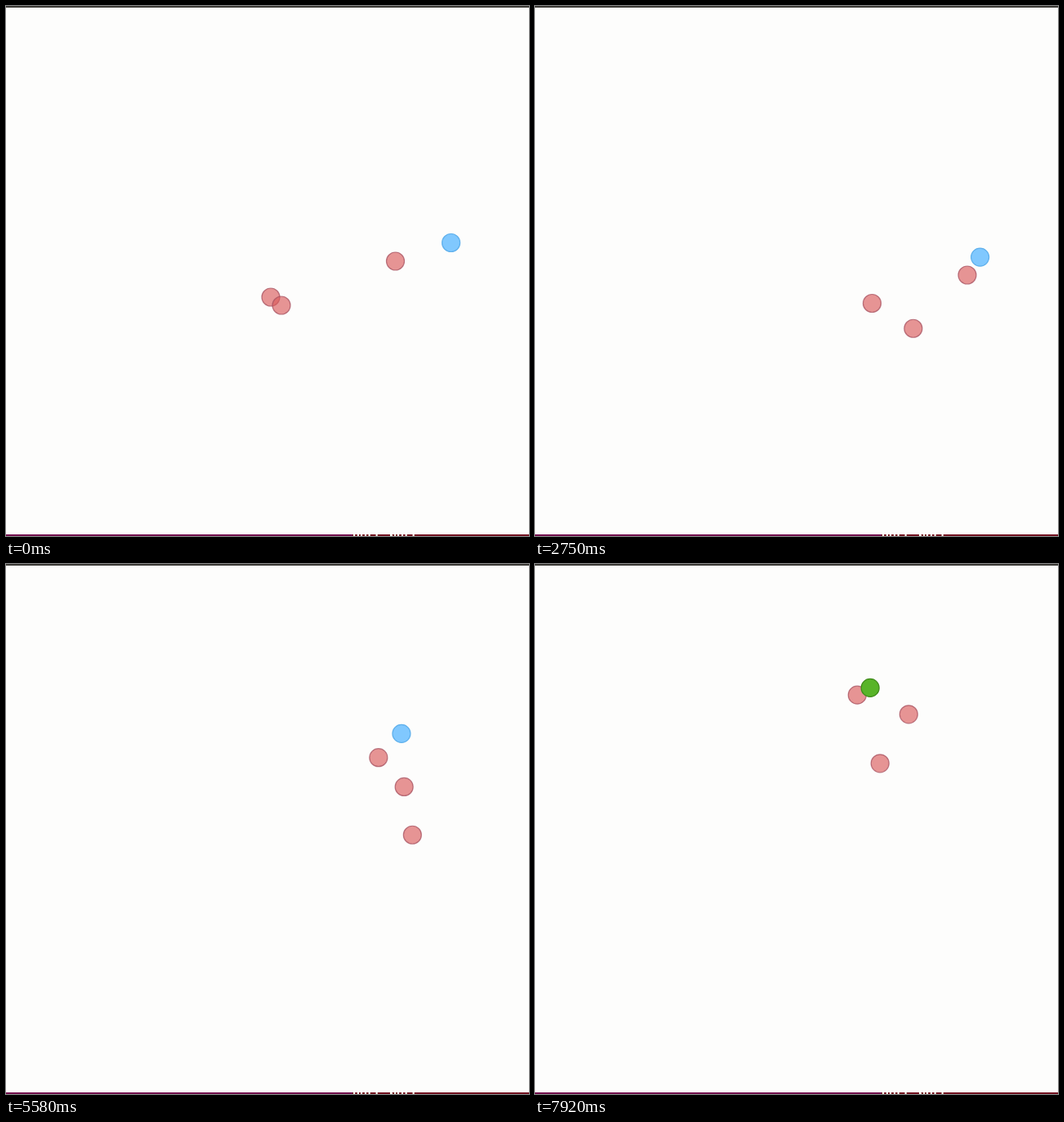
Write an HTML page with a canvas that moves like this. It is 640 px wide and 648 px high and loops after 8000 ms.

```html
<!DOCTYPE html>
<html lang="en">
<head>
<meta charset="utf-8">
<title>Pursuit</title>
<style>
  html, body { margin: 0; width: 100%; height: 100%; overflow: hidden; background: #fdfdfc; }
  canvas { display: block; }
</style>
</head>
<body>
<canvas id="stage" width="640" height="648"></canvas>
<script>
const ctx = document.getElementById('stage').getContext('2d');
const LOOP = 8000, FRAMES = 96, RADIUS = 11, CATCH_DISTANCE = 22, WALL = 544.6;

const RED = { fill: 'rgba(217,89,89,.64)', rim: 'rgba(165,80,95,.75)' };
const BLUE = { fill: '#80c8fe', rim: '#5fb0ec' };
const GREEN = { fill: '#58b428', rim: '#418c1c' };

// Key points, evenly spaced over the loop
const leader = [[476.5, 312], [529.5, 338.5], [523, 320.5], [483, 272.5], [428, 200], [392.5, 158]];
const flanker = [[324, 356], [371.5, 374], [428, 355], [476, 307], [488.5, 235.5], [455.5, 181]];
const trailer = [[337, 366], [415, 371], [478, 398], [511.5, 363.5], [471.5, 295], [419.5, 241]];
const runner = [[WALL, 289.5], [WALL, 334], [546, 292], [515, 238.5], [450, 178], [408, 150]];

function slope(path, i, axis) {
  const from = Math.max(i - 1, 0), to = Math.min(i + 1, path.length - 1);
  return (path[to][axis] - path[from][axis]) / (to - from);
}

// Smooth curve through the key points; progress runs from 0 to 1
function locate(path, progress) {
  const along = progress * (path.length - 1);
  const i = Math.floor(along), u = along - i;
  const ease = u * u * (3 - 2 * u);
  const [x, y] = [0, 1].map(axis =>
    path[i][axis] * (1 - ease) + path[i + 1][axis] * ease +
    u * (1 - u) * ((1 - u) * slope(path, i, axis) - u * slope(path, i + 1, axis)));
  return [Math.min(x, WALL), y];
}

function disc([x, y], { fill, rim }) {
  ctx.beginPath();
  ctx.arc(x, y, RADIUS, 0, Math.PI * 2);
  ctx.fillStyle = fill;
  ctx.fill();
  ctx.strokeStyle = rim;
  ctx.lineWidth = 1.2;
  ctx.stroke();
}

function bar(x, y, width, height, color) {
  ctx.fillStyle = color;
  ctx.fillRect(x, y, width, height);
}

function drawBackdrop() {
  bar(0, 0, 640, 648, '#fdfdfc');
  bar(0, 0, 640, 2, '#3c3b37');
  bar(0, 646, 424, 2, '#74104f');
  bar(424, 646, 216, 2, '#741422');
  ctx.fillStyle = '#fffdf4';
  ctx.font = 'bold 15px "Liberation Mono", monospace';
  ctx.fillText('HULL NULL', 424, 655.5);
}

function render(now) {
  const progress = Math.floor((now % LOOP + 4) / LOOP * FRAMES) % FRAMES / FRAMES;
  const [hunter, left, right, prey] = [leader, flanker, trailer, runner].map(path => locate(path, progress));
  const caught = Math.hypot(hunter[0] - prey[0], hunter[1] - prey[1]) < CATCH_DISTANCE;

  drawBackdrop();
  for (const place of [hunter, left, right]) disc(place, RED);
  disc(prey, caught ? GREEN : BLUE);
}

const start = performance.now();
function tick() {
  render(performance.now() - start);
  requestAnimationFrame(tick);
}
tick();
</script>
</body>
</html>
```
